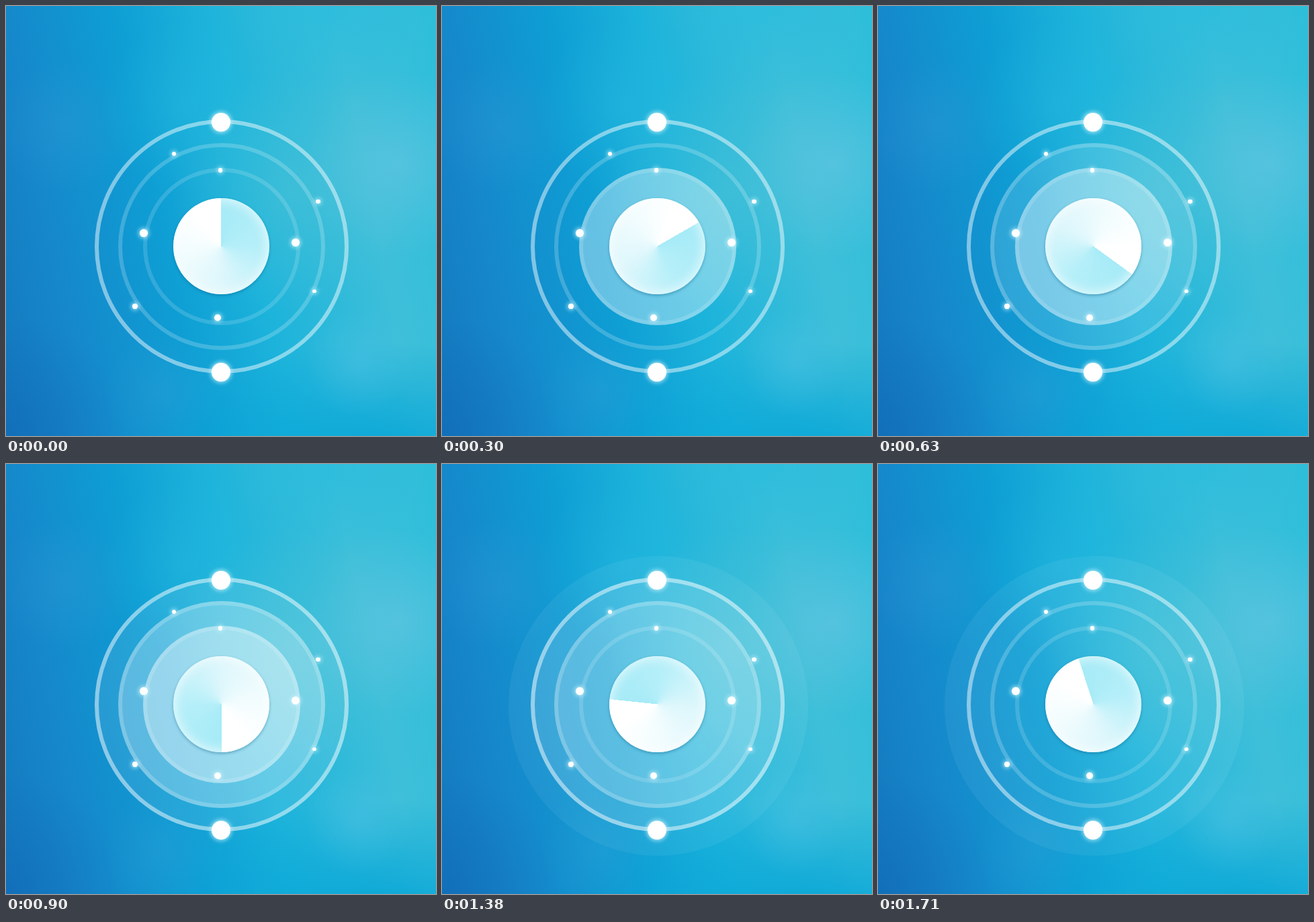
Write an HTML page that moves like this. It is 640x640 px and loops after 1740 ms.

```html
<!DOCTYPE html>
<html lang="en">
<head>
<meta charset="utf-8">
<title>Orbit timer</title>
<style>
  html, body { margin: 0; width: 100%; height: 100%; overflow: hidden; }
  #stage {
    position: relative; width: 640px; height: 640px; overflow: hidden;
    background:
      radial-gradient(circle at 585px 235px, rgba(105,198,226,.55), transparent 140px),
      radial-gradient(circle at 525px 530px, rgba(80,195,228,.45), transparent 80px),
      radial-gradient(circle at 480px 0, rgba(38,188,222,.7), transparent 140px),
      radial-gradient(circle at 425px 275px, rgba(80,196,214,.5), transparent 180px),
      radial-gradient(circle at 270px 150px, rgba(40,188,224,.4), transparent 130px),
      radial-gradient(circle at 235px 575px, rgba(60,165,218,.25), transparent 90px),
      radial-gradient(circle at 85px 180px, rgba(62,160,218,.25), transparent 100px),
      radial-gradient(circle at 0 640px, rgba(15,100,180,.45), transparent 180px),
      radial-gradient(ellipse 370px 170px at 570px 670px, rgba(6,165,215,.95), transparent),
      linear-gradient(78deg, #1478be, #1686ca 15%, #0e9ed4 38%, #1cb3db 55%, #3ebfd9 80%, #2dbeda);
  }
  #stage div { position: absolute; box-sizing: border-box; border-radius: 50%; }
  .fill { background: #fff; }
  .ring { border: 6px solid #fff; }
  .dot { background: #fff; box-shadow: 0 0 6px 1.5px rgba(205,245,255,.8); }
  .dial { box-shadow: 0 2px 4px rgba(0,90,130,.4), inset 0 0 18px 1px rgba(255,255,255,.8); }
</style>
</head>
<body>
<div id="stage"></div>
<script>
const LOOP = 1740, STEP = 30, FADE = 180;
const stage = document.getElementById('stage');

function circle(kind, x, y, r, opacity = 1) {
  const el = document.createElement('div');
  el.className = kind;
  el.style.cssText =
    `left:${x - r}px;top:${y - r}px;width:${2 * r}px;height:${2 * r}px;opacity:${opacity}`;
  return stage.appendChild(el);
}

// Ramps up after start, holds, and ramps down to zero at end
const pulse = (t, start, end) =>
  Math.max(0, Math.min(1, (t - start) / FADE, (end - t) / FADE));

const halo = circle('fill', 322, 360, 223, 0);

const orbits = [
  { r: 189, line: .47, start: 780, end: 1740, peak: .13 },
  { r: 154, line: .2, start: 540, end: 1500, peak: .25 },
  { r: 117, line: .15, start: 0, end: 1350, peak: .36 }
];
for (const o of orbits) o.fill = circle('fill', 320.8, 358.2, o.r, 0);
for (const o of orbits) circle('ring', 320.5, 357.5, o.r, o.line);

[
  [319.5, 172.5, 14], [319.5, 544.5, 14], [204.5, 338, 6], [431, 352, 6],
  [315, 464, 5], [192, 447, 3.7], [250, 220, 3.3], [464.5, 291, 3.3],
  [319, 244.5, 3.2], [459, 424.5, 2.8]
].forEach(([x, y, r]) => circle('dot', x, y, r));

const dial = circle('dial', 320.5, 357.5, 71.5);

function draw(now) {
  const t = Math.floor(now % LOOP / STEP) * STEP;
  halo.style.opacity = .055 * pulse(t, 1000, 2 * LOOP);
  for (const o of orbits) o.fill.style.opacity = o.peak * pulse(t, o.start, o.end);
  dial.style.background =
    `conic-gradient(from ${t / 5}deg, #a6ebf7, #b5eff9 25%, #def7fc 50%, #f4fdfe 75%, #fff 90%)`;
  requestAnimationFrame(draw);
}
draw(0);
</script>
</body>
</html>
```
